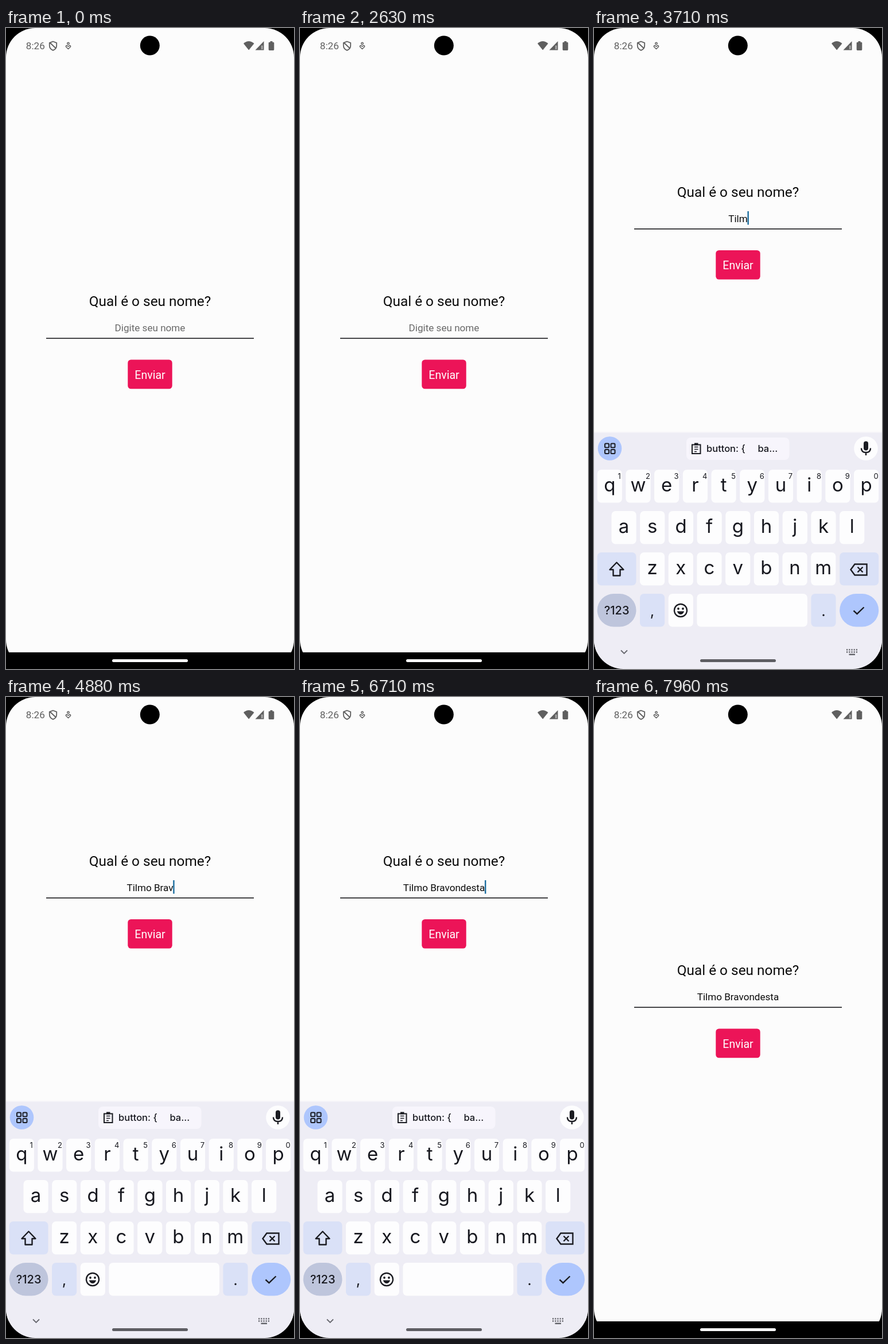
Write an HTML page that moves like this. It is 502 px wide and 1116 px high and loops after 8000 ms.

```html
<!DOCTYPE html>
<html lang="pt-BR">
<head>
<meta charset="utf-8">
<title>Qual é o seu nome?</title>
<style>
  html, body { margin: 0; width: 100%; height: 100%; overflow: hidden; background: #000; }
  svg { display: block; width: 100vw; height: 100vh; }
  text { font-family: Roboto, sans-serif; text-anchor: middle; white-space: pre; }
  #board text { font-family: Inter, Roboto, sans-serif; fill: #17181f; }
  .line { fill: none; stroke: #1b1c22; stroke-width: 2.4; }
</style>
</head>
<body>
<svg viewBox="0 0 502 1116" preserveAspectRatio="none">
  <defs>
    <clipPath id="screen"><rect width="502" height="1116" rx="51"/></clipPath>
  </defs>
  <rect width="502" height="1116"/>
  <g clip-path="url(#screen)">
    <rect width="502" height="1087" fill="#fcfcfc"/>

    <g id="status" fill="#5f5f5f">
      <text x="51.3" y="37" font-size="17.1">8:26</text>
      <g fill="none" stroke="#5f5f5f" stroke-width="1.8">
        <path d="M82 23.5l6.2 2.3v4.6c0 4-2.6 7-6.2 8.500c-3.600-1.500-6.200-4.500-6.200-8.500v-4.600zM77 26l9.500 9"/>
        <circle cx="108.500" cy="27" r="1.700" stroke-width="1.500"/>
        <path d="M108.500 36.500l-4-3.800q-.5-2.200 1.600-2.200l2.400 1.700l2.400-1.700q2.100 0 1.600 2.200z" stroke-width="1.500"/>
      </g>
      <path d="M414 27q9-8 18.500 0L423.200 38.500z"/>
      <path d="M449.500 23v15.500h-15z"/>
      <path d="M444.800 30.500h3v6.500h-3z" fill="#a8a8a8"/>
      <path d="M460.500 23h4v1.800h1.500q1.300 0 1.300 1.300v11.500q0 1.300-1.300 1.300h-7q-1.300 0-1.300-1.300v-11.500q0-1.300 1.300-1.300h1.500z"/>
    </g>
    <circle cx="250.800" cy="30.500" r="17"/>

    <g id="form">
      <text x="251" y="484" font-size="24.400" fill="#0c0c0c">Qual é o seu nome?</text>
      <text id="field" x="251" y="528" font-size="17.100"></text>
      <rect id="caret" y="509.500" width="2.400" height="23.500" fill="#1b6d9f"/>
      <rect x="70" y="539.500" width="362" height="1.600" fill="#17171a"/>
      <rect x="212.300" y="577.500" width="77.400" height="50.800" rx="5.500" fill="#ec1458"/>
      <text x="251" y="610.500" font-size="19.500" fill="#fff">Enviar</text>
    </g>

    <rect y="1087" width="502" height="29"/>

    <g id="board">
      <rect y="703" width="502" height="3" fill="#f5f4f9"/>
      <rect y="705" width="502" height="420" fill="#eeedf5"/>
      <circle cx="27.500" cy="732" r="20.800" fill="#aec6fd"/>
      <rect x="161" y="713" width="179.500" height="39" rx="8" fill="#f7f5fc"/>
      <circle cx="474" cy="732" r="20.800" fill="#fdfdfe"/>
      <g class="line">
        <g id="tiles" stroke-width="2"></g>
        <path d="M171 725.500h14.500v15.500h-14.500z" stroke-width="2"/>
        <path d="M175 729.500h6.500M175 733.500h6.500M175 737.500h4" stroke-width="1.700"/>
        <path d="M175 724.500h6.500" stroke-width="4"/>
        <path d="M466 731.500q0 7.500 8 7.500t8-7.500M474 739v5"/>
      </g>
      <rect x="470" y="719.500" width="8" height="16" rx="4" fill="#1b1c22"/>
      <text x="196" y="738" font-size="16.500" font-weight="500" style="text-anchor:start">button: {</text>
      <text x="285.500" y="738" font-size="16.500" font-weight="500" style="text-anchor:start">ba...</text>
      <g id="keys"></g>
      <g class="line">
        <path d="M39.500 930.500l12 12.500h-6v10.500h-12v-10.500h-6z" stroke-linejoin="round"/>
        <path d="M454.500 933.500h21v19h-21l-7-9.500zM459.500 938.500l9 9m0-9l-9 9"/>
        <circle cx="151" cy="1014" r="11"/>
        <path d="M452.500 1014.500l6 5.500l12-11.500"/>
        <path d="M47 1083.500l5.500 5.500l5.500-5.500" stroke="#66676d" stroke-width="1.800"/>
        <path d="M440 1082.500h19M440 1086.500h19" stroke="#66676d" stroke-dasharray="2.200 2"/>
        <path d="M444.500 1090.800h10.500" stroke="#66676d"/>
      </g>
      <g fill="#1b1c22">
        <circle cx="147" cy="1011" r="1.900"/>
        <circle cx="155" cy="1011" r="1.900"/>
        <path d="M144.800 1015.500h12.400q-2 5.500-6.200 5.500t-6.200-5.500z"/>
      </g>
    </g>

    <rect id="pill" x="185" y="1099" width="132" height="5" rx="2.500"/>
  </g>
</svg>
<script>
const LOOP = 8000;
const NAME = "Tilmo Bravondesta";
const HINT = "Digite seu nome";
const FOCUS = 2900, FIRST_KEY = 3100, KEY_GAP = 195, BLINK = 500;
const SHOW = 3171, SHOW_TIME = 285, HIDE = 7220, HIDE_TIME = 200;
const BOARD_HEIGHT = 413, LIFT = 190.5;
const LAST_KEY = FIRST_KEY + (NAME.length - 1) * KEY_GAP;

const el = id => document.getElementById(id);
const [form, field, caret, board, pill] = ["form", "field", "caret", "board", "pill"].map(el);
const clamp = v => Math.min(1, Math.max(0, v));
const ramp = (t, start, length) => clamp((t - start) / length);

function add(parent, tag, attrs, text = "") {
  const node = document.createElementNS("http://www.w3.org/2000/svg", tag);
  for (const key in attrs) node.setAttribute(key, attrs[key]);
  node.textContent = text;
  return parent.appendChild(node);
}

function addKey(x, y, width = 43.2, fill = "#fdfdfe", rx = 7) {
  add(el("keys"), "rect", { x, y, width, height: 57.5, rx, fill });
}

function addLabel(x, y, size, label, weight = 400) {
  add(el("keys"), "text", { x, y, "font-size": size, "font-weight": weight }, label);
}

function buildBoard() {
  const pitch = 49.7, soft = "#dae1f7";
  [["qwertyuiop", 5.7], ["asdfghjkl", 30.5], ["zxcvbnm", 80]].forEach(([letters, left], row) => {
    const y = 769 + row * 72;
    [...letters].forEach((letter, i) => {
      const x = left + i * pitch;
      addKey(x, y);
      addLabel(x + 21.6, y + 38.3, 33, letter);
      if (row === 0) addLabel(x + 38.5, y + 15.5, 13, (i + 1) % 10);
    });
  });
  addKey(5.7, 913, 67.8, soft);
  addKey(428.2, 913, 68, soft);
  addKey(5.7, 985, 67.8, "#bec5dc", 28.7);
  addKey(80, 985, 43.2, soft);
  addKey(129.7, 985);
  addKey(179.4, 985, 192.5);
  addKey(378.4, 985, 43.2, soft);
  addKey(428.2, 985, 68, "#aec6fd", 28.7);
  addLabel(39.6, 1021, 20, "?123", 500);
  addLabel(101.6, 1024, 26, ",");
  addLabel(400, 1024, 26, ".");
  for (const x of [19, 29.5])
    for (const y of [723.5, 734])
      add(el("tiles"), "rect", { x, y, width: 7, height: 7, rx: 1.5 });
}

// Cubic Bézier easing with end points 0,0 and 1,1, solved by bisection.
function ease(x, x1, y1, x2, y2) {
  const at = (s, a, b) => 3 * a * s * (1 - s) ** 2 + 3 * b * s * s * (1 - s) + s ** 3;
  let low = 0, high = 1;
  for (let i = 0; i < 20; i++) {
    const mid = (low + high) / 2;
    if (at(mid, x1, x2) < x) low = mid; else high = mid;
  }
  return at(low, y1, y2);
}

function render(t) {
  const typed = Math.max(0, Math.min(NAME.length, Math.floor((t - FIRST_KEY) / KEY_GAP) + 1));
  field.textContent = typed ? NAME.slice(0, typed) : HINT;
  field.setAttribute("fill", typed ? "#0c0c0c" : "#696969");

  const end = typed ? field.getComputedTextLength() / 2 : 0;
  const idle = t > LAST_KEY ? t - LAST_KEY : 0;
  const lit = t >= FOCUS && Math.floor(idle / BLINK) % 2 === 0;
  caret.setAttribute("x", 251 + end - 0.3);
  caret.setAttribute("visibility", lit ? "visible" : "hidden");

  const raised = t >= FIRST_KEY && t < HIDE;
  form.setAttribute("transform", `translate(0 ${raised ? -LIFT : 0})`);

  const shown = t < HIDE
    ? ease(ramp(t, SHOW, SHOW_TIME), 0.4, 0, 0.2, 1)
    : 1 - ease(ramp(t, HIDE, HIDE_TIME), 0.4, 0, 1, 1);
  board.setAttribute("transform", `translate(0 ${BOARD_HEIGHT * (1 - shown)})`);
  board.setAttribute("visibility", shown > 0.001 ? "visible" : "hidden");

  const dark = ramp(t, 3420, 200) - ramp(t, 7560, 300);
  const mix = (a, b) => Math.round(a + (b - a) * dark);
  pill.setAttribute("fill", `rgb(${mix(252, 94)} ${mix(252, 94)} ${mix(252, 99)})`);
}

buildBoard();
const start = performance.now();
function tick() {
  render((performance.now() - start) % LOOP);
  requestAnimationFrame(tick);
}
tick();
</script>
</body>
</html>
```
